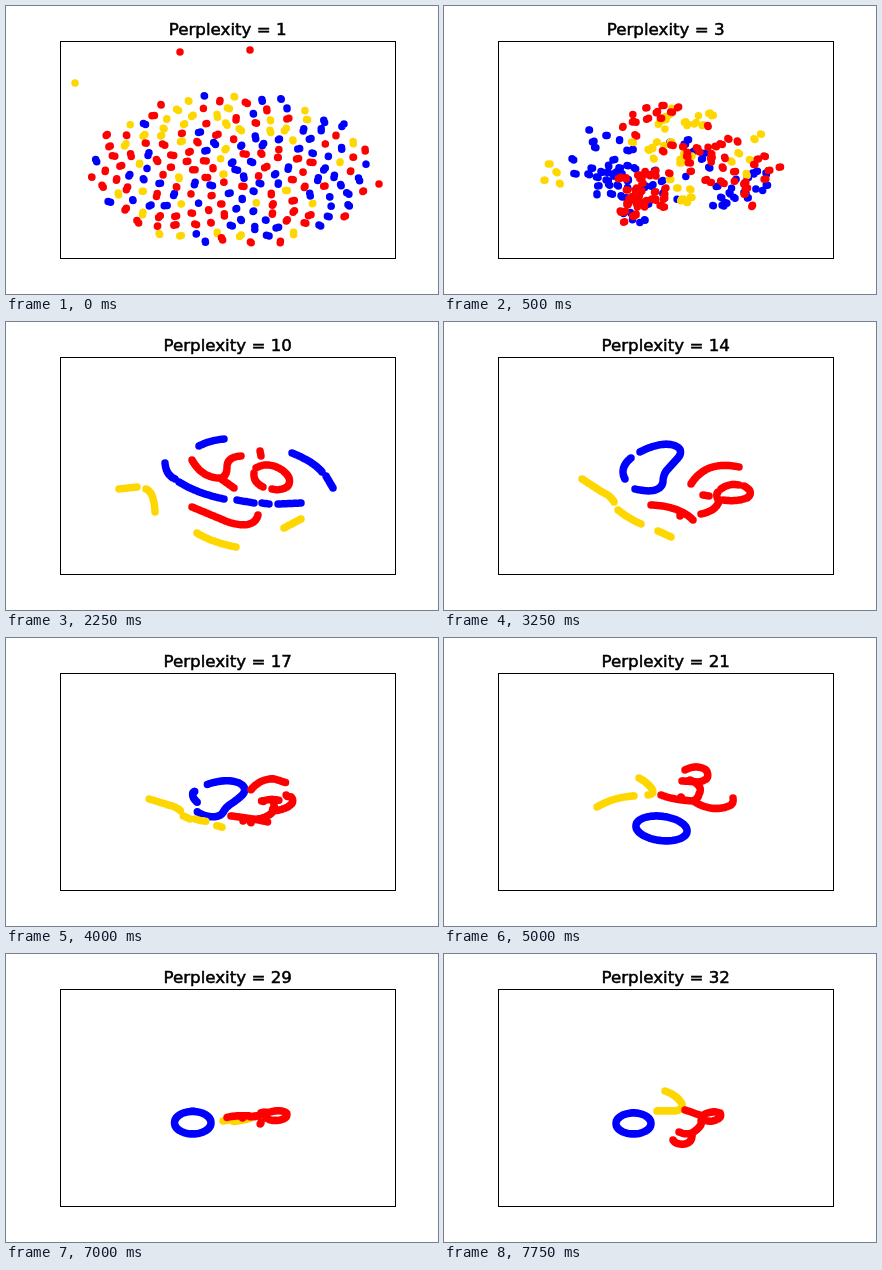
An HTML page with a canvas that plays this animation: 432x288 px, repeating every 8000 ms.

```html
<!DOCTYPE html>
<html lang="en">
<head>
<meta charset="utf-8">
<title>Perplexity</title>
<style>
  html, body { margin: 0; width: 100%; height: 100%; overflow: hidden; background: #fff; }
  canvas, svg { position: absolute; left: 0; top: 0; }
  text { font: 16.67px "DejaVu Sans", sans-serif; text-anchor: middle; stroke: #000; stroke-width: .5px; }
</style>
</head>
<body>
<canvas width="432" height="288"></canvas>
<svg width="432" height="288" viewBox="0 0 432 288">
  <path id="pen" fill="none"/>
  <rect x="54.5" y="35.5" width="335" height="217" fill="none" stroke="#000"/>
  <text id="title" x="221.7" y="28.7">Perplexity = 1</text>
</svg>
<script>
const STEP = 250, STEPS = 32, RADIUS = 3.75;
const ctx = document.querySelector('canvas').getContext('2d');
const pen = document.getElementById('pen');
const title = document.getElementById('title');

const ring = (cx, cy, rx, ry, tilt = 0, dy = 0) =>
  `M${cx - rx} ${cy - dy}A${rx} ${ry} ${tilt} 1 1 ${cx + rx} ${cy + dy}A${rx} ${ry} ${tilt} 1 1 ${cx - rx} ${cy - dy}`;

// Embedding curves by perplexity; points are spread evenly along them
const poses = [
  { at: 6,
    blue: 'M148 127L158 130M165 138L166 139M174 144Q181 148 184 155Q184 161 178 162M170 162Q163 160 158 155Q143 149 131 154Q122 161 132 169Q149 175 151 189M139 197L148 205M158 209Q168 211 175 208M180 203L193 195M207 161Q222 157 240 155M243 188L268 200M275 186L289 189M299 190L315 195',
    gold: 'M93 166L105 174M195 136L211 148M214 123L253 106M295 118L312 136M247 178L257 174M265 173L290 172M297 171L317 169',
    red: 'M180 118L184 112M189 124L193 126M195 106Q207 99 220 100M221 134L257 146M251 123Q275 133 274 144M258 160L284 156M290 155L320 151M343 180L354 170M194 173L207 171M191 186Q178 184 184 175M234 168Q213 190 215 207M207 217Q211 203 224 208M213 223L217 226M237 202L244 210M261 218L267 217M280 213L289 208M243 230L255 236' },
  { at: 10,
    blue: 'M193 124Q205 118 218 117M159 141Q160 153 169 157M173 160Q190 171 218 177M231 178L248 181M256 181L263 182M272 182L295 181M286 131Q308 140 316 150M320 154L327 166',
    gold: 'M113 167L131 165M140 167Q148 170 149 190M191 211Q205 220 230 225M278 206L295 197',
    red: 'M186 138Q196 156 214 156M235 134Q221 135 221 145Q221 155 214 156L228 166M254 129L255 134M250 146Q262 139 276 148Q288 157 281 165Q274 169 266 167M257 165Q247 160 248 151M186 185L222 200Q248 208 252 193' },
  { at: 14,
    blue: 'M187 136Q175 146 181 157M196 130Q215 120 229 123Q241 127 234 136L224 147Q219 152 219 160Q216 173 191 167',
    gold: 'M138 157L158 170Q167 174 170 180M174 188Q185 197 197 202M214 209L227 215',
    red: 'M247 162Q262 138 295 145M259 173L265 174M300 164Q311 170 303 176Q292 180 279 178M277 167Q285 161 295 163M257 192Q272 189 275 179Q271 173 274 170M207 183Q235 184 249 198M236 191L236 194' },
  { at: 21,
    blue: ring(217.5, 190.5, 25.5, 12, 7, 3.5),
    gold: 'M153 169Q170 159 190 158M204 157Q211 156 208 151Q204 145 195 140',
    red: 'M241 132Q253 126 262 132Q268 142 254 144L238 143M246 142Q260 148 255 156Q254 161 249 163M217 157Q230 162 249 163Q268 175 285 168Q290 166 289 160M237 159L239 162' },
  { at: 26,
    blue: ring(184, 168, 19, 12),
    gold: 'M221 177Q235 172 249 173Q252 187 234 198',
    red: 'M213 141Q214 135 222 134Q234 134 237 145M226 149Q226 146 237 146Q247 148 254 152M251 171Q258 168 261 162M259 158Q266 154 275 155Q287 156 286 161Q283 167 270 166Q262 165 261 160' },
  { at: 32,
    blue: ring(189.5, 169.5, 17.5, 10.5),
    gold: 'M213 157L231 157Q239 156 238 150Q234 142 221 137',
    red: 'M229 186Q232 191 241 190Q249 188 248 179Q241 181 235 178M248 179Q259 172 257 167M241 156Q250 159 258 162Q267 156 276 159Q279 164 269 167Q262 168 257 164' }
];

const groups = [
  { name: 'blue', color: '#00f', pairs: 70 },
  { name: 'gold', color: '#ffd700', pairs: 42 },
  { name: 'red', color: '#f00', pairs: 88 }
];

let seed = 11;
function rand() {
  seed = (seed * 16807) % 2147483647;
  return seed / 2147483647;
}

// n points over all strokes of a path, ends included
function sample(path, n) {
  const strokes = path.split('M').slice(1).map(s => {
    pen.setAttribute('d', 'M' + s);
    return { d: 'M' + s, len: pen.getTotalLength() + 2.5 };
  });
  const total = strokes.reduce((sum, s) => sum + s.len, 0);
  const out = [];
  let run = 0;
  for (const { d, len } of strokes) {
    run += len;
    const count = Math.round(n * run / total) - out.length;
    pen.setAttribute('d', d);
    const span = pen.getTotalLength();
    for (let i = 0; i < count; i++) {
      const p = pen.getPointAtLength(count > 1 ? span * i / (count - 1) : span / 2);
      out.push([p.x, p.y]);
    }
  }
  return out;
}

// Scattered pairs in a flat sunflower disc, plus a few strays
function scatter() {
  const spots = { blue: [], gold: [[69, 77, 0, 0]], red: [[174, 46, 0, 0], [244, 44, 0, 0], [373, 178, 0, 0]] };
  const n = groups.reduce((sum, g) => sum + g.pairs, 0) - 4;
  for (let i = 0; i < n; i++) {
    const a = i * 2.39996, r = ((i + .5) / n) ** .52;
    const x = 226 + 140 * r * Math.cos(a) + rand() * 4 - 2;
    const y = 164 + 77 * r * Math.sin(a) + rand() * 3 - 1.5;
    const bias = { blue: x > 225 ? 1.3 : .8, gold: y < 145 ? 1.6 : .6, red: x < 215 ? 1.3 : .9 };
    const weights = groups.map(g => (g.pairs - spots[g.name].length) * bias[g.name]);
    let pick = rand() * weights.reduce((p, q) => p + q), k = 0;
    while (k < 2 && pick >= weights[k]) pick -= weights[k++];
    const turn = rand() * 6.28, gap = rand() * 1.6;
    spots[groups[k].name].push([x, y, gap * Math.cos(turn), gap * Math.sin(turn)]);
  }
  return spots;
}

// Give each pair on the first curves its nearest free spot
function startPoints(spots, target) {
  const free = spots.slice(), out = [];
  for (let i = 0; i < target.length; i += 2) {
    const [tx, ty] = target[i];
    let best = 0, min = Infinity;
    free.forEach(([x, y], k) => {
      const d = Math.hypot(x - tx, y - ty);
      if (d < min) { min = d; best = k; }
    });
    const [x, y, dx, dy] = free.splice(best, 1)[0];
    out.push([x - dx, y - dy], [x + dx, y + dy]);
  }
  return out;
}

const spots = scatter();
for (const g of groups) {
  g.poses = poses.map(p => sample(p[g.name], g.pairs * 2));
  g.poses.unshift(startPoints(spots[g.name], g.poses[0]));
}
pen.removeAttribute('d');

const stops = [1, ...poses.map(p => p.at)];
const smooth = u => u * u * (3 - 2 * u);

function draw(perplexity) {
  title.textContent = 'Perplexity = ' + perplexity;
  let k = 0;
  while (k < stops.length - 2 && perplexity >= stops[k + 1]) k++;
  const u = (perplexity - stops[k]) / (stops[k + 1] - stops[k]);
  const mix = k ? smooth(smooth(u)) : 1 - (1 - u) ** 2;
  ctx.clearRect(0, 0, 432, 288);
  for (const g of groups) {
    const from = g.poses[k], to = g.poses[k + 1];
    ctx.fillStyle = g.color;
    ctx.beginPath();
    from.forEach(([x, y], i) => {
      const px = x + (to[i][0] - x) * mix, py = y + (to[i][1] - y) * mix;
      ctx.moveTo(px + RADIUS, py);
      ctx.arc(px, py, RADIUS, 0, 7);
    });
    ctx.fill();
  }
}

let shown = 0;
function tick() {
  const now = Math.floor(performance.now() / STEP) % STEPS + 1;
  if (now !== shown) draw(shown = now);
  requestAnimationFrame(tick);
}
tick();
</script>
</body>
</html>
```
